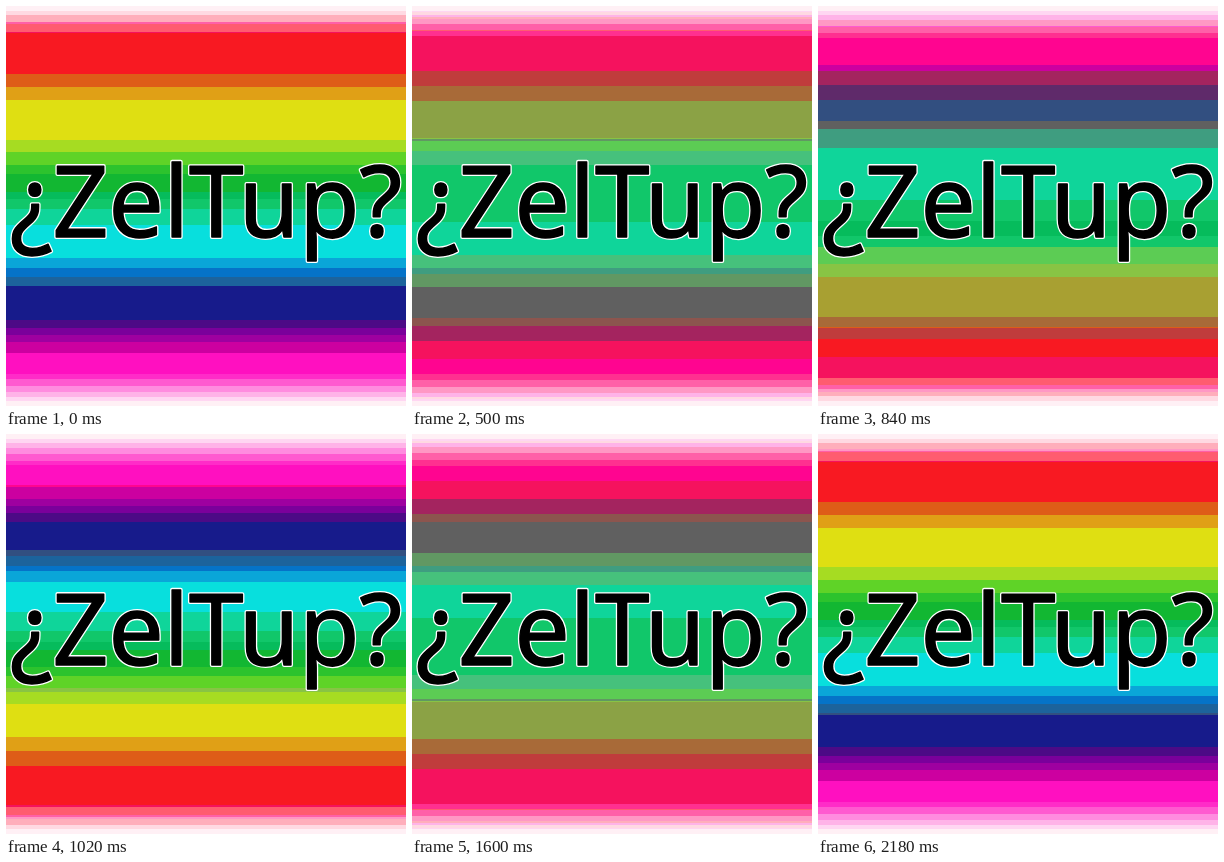
These frames come from a looping animation (400 by 400 pixels, 2200 ms). An HTML page with a canvas:

```html
<!DOCTYPE html>
<html lang="en">
<head>
<meta charset="utf-8">
<title>Rainbow question</title>
<style>
html, body { margin: 0; width: 100%; height: 100%; overflow: hidden; background: #fff }
canvas { display: block }
</style>
</head>
<body>
<canvas id="stage" width="400" height="400"></canvas>
<script>
const SIZE = 400, LAST = 51;
const ctx = document.getElementById('stage').getContext('2d');

const rgb = hex => [0, 2, 4].map(k => parseInt(hex.slice(k, k + 2), 16));
const mix = (a, b, p) => a.map((v, k) => v + (b[k] - v) * p);

// Limited colours the blended gradient snaps to
const palette = (
  'fff0f5 ffd9e2 ffaebb ff5c70 f81922 de5d18 e0a016 dfdf12 a6dc22 5fd327 ' +
  '2cc32d 12b732 06bc5c 11c76a 0fd59a 08dfdd 0aa6d8 0573c8 1c639c 171b8b ' +
  '4c0a86 7a009b 9e00a0 cc00a0 ff10c0 ff2cc8 ff5ad0 ff8cdf ffb3e8 ffd6f2 ' +
  'f5125e ff0590 ff3090 ff60a8 ff98c4 c03c3c a86a38 8ba245 a8a032 88c444 ' +
  '5ccc54 46c17c 3f9d80 619863 606060 8c554e a4245f 5f2a6a 324f80'
).split(' ').map(rgb);

// Vertical gradient: position and colour
const stops = [
  [2, 'ffffff'], [32, 'fa1222'], [59, 'fa120e'], [100, 'dfdf12'], [128, 'dfdf12'],
  [153, '5fd428'], [171, '12b732'], [180, '12b732'], [228, '08dfdd'], [247, '08dfdd'],
  [266, '087ac8'], [276, '195c9c'], [285, '171b8b'], [309, '171b8b'], [341, 'd200a0'],
  [354, 'ff10c0'], [366, 'ff10c0'], [399, 'ffffff']
].map(([y, hex]) => [y, rgb(hex)]);

function gradient(y) {
  const n = stops.findIndex(s => s[0] > y);
  if (n < 1) return stops[n ? stops.length - 1 : 0][1];
  const [y0, a] = stops[n - 1], [y1, b] = stops[n];
  return mix(a, b, (y - y0) / (y1 - y0));
}

function nearest(c) {
  let best = Infinity, found;
  for (const p of palette) {
    const d = (c[0] - p[0]) ** 2 + (c[1] - p[1]) ** 2 + (c[2] - p[2]) ** 2;
    if (d < best) { best = d; found = p; }
  }
  return found;
}

const rows = Array.from({ length: SIZE }, (_, y) => gradient(y + 0.5));

function drawText() {
  const text = '¿ZelTup?';
  ctx.font = '98px "Noto Sans", "Open Sans", sans-serif';
  ctx.textAlign = 'center';
  ctx.lineJoin = 'round';
  for (const [color, width] of [['#fff', 4], ['#000', 1.4]]) {
    ctx.strokeStyle = color;
    ctx.lineWidth = width;
    ctx.strokeText(text, 200, 231);
  }
  ctx.fillStyle = '#000';
  ctx.fillText(text, 200, 231);
}

function draw(step) {
  rows.forEach((color, y) => {
    ctx.fillStyle = `rgb(${nearest(mix(color, rows[SIZE - 1 - y], step / LAST))})`;
    ctx.fillRect(0, y, SIZE, 1);
  });
  drawText();
}

// Crossfade to the flipped gradient and back, resting at both ends
let shown = -1;
function tick() {
  const t = performance.now() % 2200, n = Math.floor(t / 20);
  const step = t < 1200 ? Math.min(LAST, Math.max(0, n - 4)) : 110 - n;
  if (step !== shown) draw(shown = step);
  requestAnimationFrame(tick);
}
tick();
</script>
</body>
</html>
```
